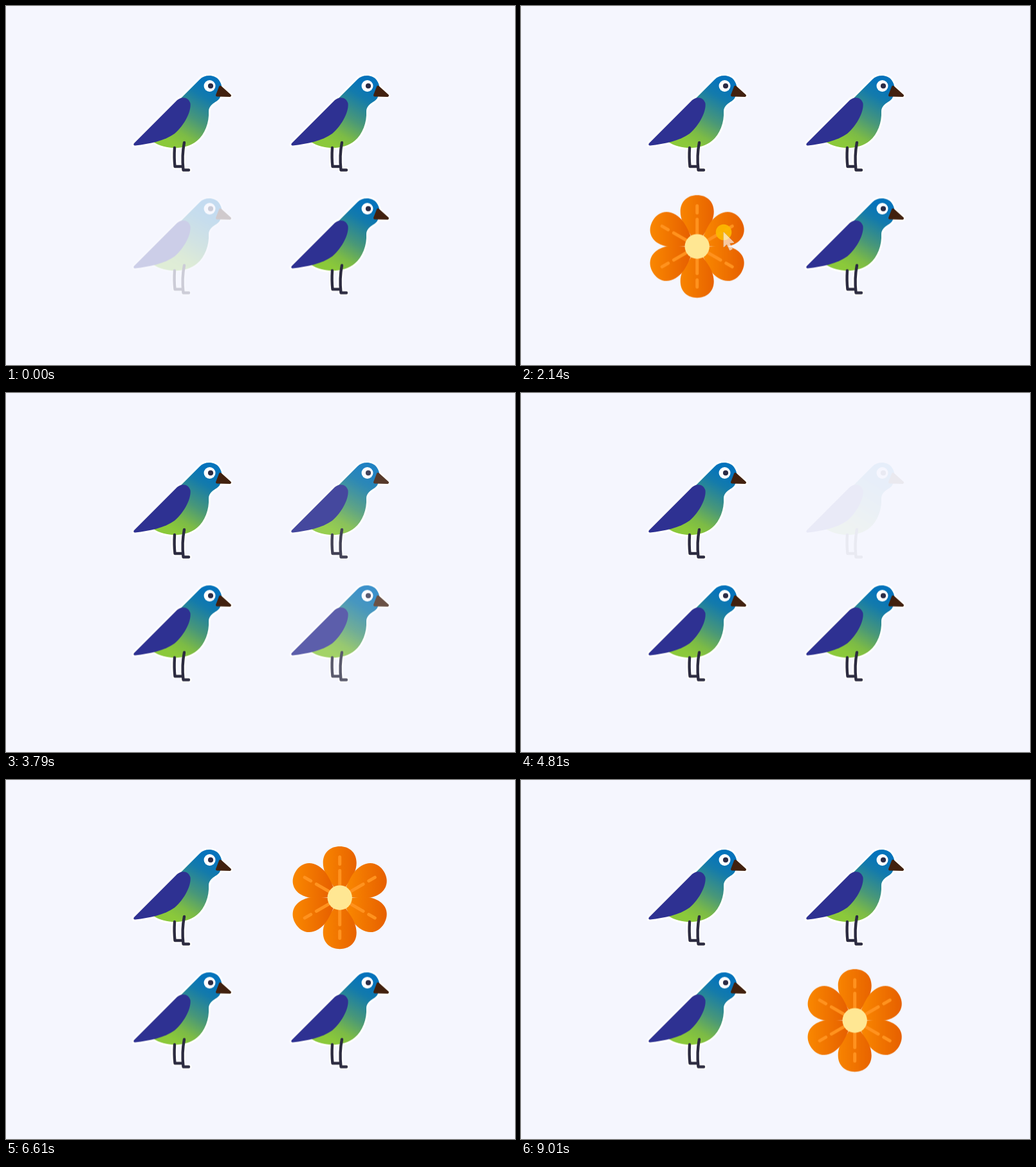
Recreate the animation shown at these times as an HTML page with a canvas. Size 791 by 557 pixels, loop 9420 ms.

```html
<!DOCTYPE html>
<html lang="en">
<head>
<meta charset="utf-8">
<title>Birds and a flower</title>
<style>
html, body { margin: 0; width: 100%; height: 100%; overflow: hidden; background: #f5f6fe; }
canvas { display: block; }
</style>
</head>
<body>
<canvas id="stage" width="791" height="557"></canvas>
<script>
const LOOP = 9420, HOP = 600;
const ctx = document.getElementById('stage').getContext('2d');

// Cells: 0 top left, 1 top right, 2 bottom left, 3 bottom right
const cellX = i => (i % 2) * 245;
const cellY = i => Math.floor(i / 2) * 190.5;

// The flower leaves `from` at time t and turns up in `to`
const hops = [
  { t: -60, from: 2, to: 3 },
  { t: 1100, from: 3, to: 2 },
  { t: 2180, from: 2, to: 3 },
  { t: 3560, from: 3, to: 1 },
  { t: 4795, from: 1, to: 0 },
  { t: 5985, from: 0, to: 1 },
  { t: 7420, from: 1, to: 0 },
  { t: 8385, from: 0, to: 3 }
];

// Pointer moves along a curve a-b-c from t0 to t1, presses at press, goes at end
const moves = [
  { t0: 420, t1: 950, press: 1030, end: 1120, a: [658, 498], b: [600, 430], c: [515, 372] },
  { t0: 1330, t1: 1730, press: 1870, end: 2220, a: [515, 372], b: [420, 330], c: [315, 351] },
  { t0: 2850, t1: 3180, press: 3440, end: 3600, a: [356, 352], b: [400, 335], c: [480, 366] },
  { t0: 3820, t1: 4200, press: 9999, end: 4795, a: [470, 350], b: [440, 290], c: [500, 200] },
  { t0: 5380, t1: 5910, press: 5915, end: 6030, a: [447, 304], b: [385, 284], c: [300, 228] },
  { t0: 6800, t1: 6810, press: 7150, end: 7470, a: [473, 218], b: [473, 218], c: [473, 218] },
  { t0: 7800, t1: 8090, press: 8150, end: 8430, a: [465, 239], b: [360, 240], c: [286, 226] }
];

const clamp = v => Math.max(0, Math.min(1, v));
const ramp = (t, a, b) => clamp((t - a) / (b - a));
const ease = p => p * p * (3 - 2 * p);

function sprite(draw) {
  const c = document.createElement('canvas');
  c.width = 400;
  c.height = 280;
  const g = c.getContext('2d');
  g.lineCap = g.lineJoin = 'round';
  draw(g);
  return c;
}

function disc(g, x, y, r, color) {
  g.fillStyle = color;
  g.beginPath();
  g.arc(x, y, r, 0, Math.PI * 2);
  g.fill();
}

const bird = sprite(g => {
  const body = new Path2D('M229 211 L272 143 L301 114 C309 106 324 106 331 115 ' +
    'C337 123 337 134 332 143 C329 149 316 151 315 163 C316 181 309 199 297 209 ' +
    'C279 224 248 223 229 211 Z');
  const wing = new Path2D('M199.5 212.5 L266 146 C274 139 284 142 286.5 151 ' +
    'C288 163 278 184 262 198 C247 209 223 214 201 216.5 C198 216.5 197.5 214.5 199.5 212.5 Z');
  const beak = new Path2D('M333 125.5 L348 139 L328 138.5 Z');
  const legs = new Path2D('M262 220 Q261 236 262.5 249 H274 ' +
    'M277 212 Q273 232 275.5 254.5 H284');

  g.strokeStyle = '#fff';
  g.lineWidth = 6;
  for (const p of [body, wing]) g.stroke(p);
  g.lineWidth = 9;
  for (const p of [beak, legs]) g.stroke(p);

  const shade = g.createLinearGradient(320, 124, 266, 216);
  shade.addColorStop(0, '#0573bb');
  shade.addColorStop(0.2, '#147bab');
  shade.addColorStop(0.55, '#499878');
  shade.addColorStop(0.82, '#7cbb46');
  shade.addColorStop(1, '#8bc93a');
  g.fillStyle = shade;
  g.fill(body);
  g.fillStyle = '#2e3192';
  g.fill(wing);

  g.strokeStyle = '#2c2b40';
  g.lineWidth = 4.4;
  g.stroke(legs);

  disc(g, 316.5, 124, 9, '#fff');
  disc(g, 318, 124, 4.1, '#2b2b45');
  g.fillStyle = g.strokeStyle = '#42210f';
  g.lineWidth = 4;
  g.fill(beak);
  g.stroke(beak);
});

const flower = sprite(g => {
  const cx = 273.7, cy = 182.6;
  const petal = new Path2D('M0 0 C-7 -19 -26 -32 -26 -54 ' +
    'C-26 -71 -14 -79.7 0 -79.7 C14 -79.7 26 -71 26 -54 C26 -32 7 -19 0 0 Z');
  const vein = new Path2D('M0 -20 V-42 M0 -52 V-63');
  for (let i = 0; i < 6; i++) {
    const a = i * Math.PI / 3;
    g.save();
    g.translate(cx, cy);
    g.rotate(a);
    // Light always comes from the left of the stage
    const mx = -Math.cos(a), my = Math.sin(a), r = 29;
    const shade = g.createLinearGradient(mx * r, -48 + my * r, -mx * r, -48 - my * r);
    shade.addColorStop(0, '#f98600');
    shade.addColorStop(1, '#e76100');
    g.fillStyle = shade;
    g.fill(petal);
    g.strokeStyle = '#ff921e';
    g.lineWidth = 5;
    g.stroke(vein);
    g.restore();
  }
  disc(g, cx, cy, 19.2, '#ffe793');
});

function put(image, cell, alpha) {
  if (alpha <= 0) return;
  ctx.globalAlpha = alpha;
  ctx.drawImage(image, cellX(cell), cellY(cell));
  ctx.globalAlpha = 1;
}

function drawCells(t) {
  const hop = hops.filter(h => h.t <= t).pop();
  const p = (t - hop.t) / HOP;
  for (let i = 0; i < 4; i++) {
    if (i === hop.from) put(bird, i, ramp(p, 0, 0.5));
    else if (i === hop.to) {
      put(bird, i, 1 - ramp(p, 0.35, 0.65));
      put(flower, i, ramp(p, 0.6, 1));
    } else put(bird, i, 1);
  }
}

const arrow = new Path2D('M0 0 V23 L5 18.5 L9.5 28 L13.5 26 L9 17 L16 16 Z');

function drawPointer(t) {
  const m = moves.find(m => t >= m.t0 && t < m.end);
  if (!m) return;
  const p = ease(ramp(t, m.t0, m.t1)), q = 1 - p;
  const at = k => q * q * m.a[k] + 2 * q * p * m.b[k] + p * p * m.c[k];
  const x = at(0), y = at(1);
  const fade = ramp(t, m.t0, m.t0 + 70) * ramp(m.end - t, 0, 50);

  if (t >= m.press) {
    ctx.globalAlpha = fade * 0.9;
    disc(ctx, x, y, 5 + 7.3 * ramp(t, m.press, m.press + 160), '#fcb900');
  }
  ctx.globalAlpha = fade * 0.62;
  ctx.save();
  ctx.translate(x, y);
  ctx.lineJoin = 'round';
  ctx.fillStyle = '#fff';
  ctx.fill(arrow);
  ctx.strokeStyle = '#d6cfd2';
  ctx.lineWidth = 1;
  ctx.stroke(arrow);
  ctx.restore();
  ctx.globalAlpha = 1;
}

const start = performance.now();

function frame() {
  const t = Math.max(0, performance.now() - start) % LOOP;
  ctx.fillStyle = '#f5f6fe';
  ctx.fillRect(0, 0, 791, 557);
  drawCells(t);
  drawPointer(t);
  requestAnimationFrame(frame);
}
frame();
</script>
</body>
</html>
```
